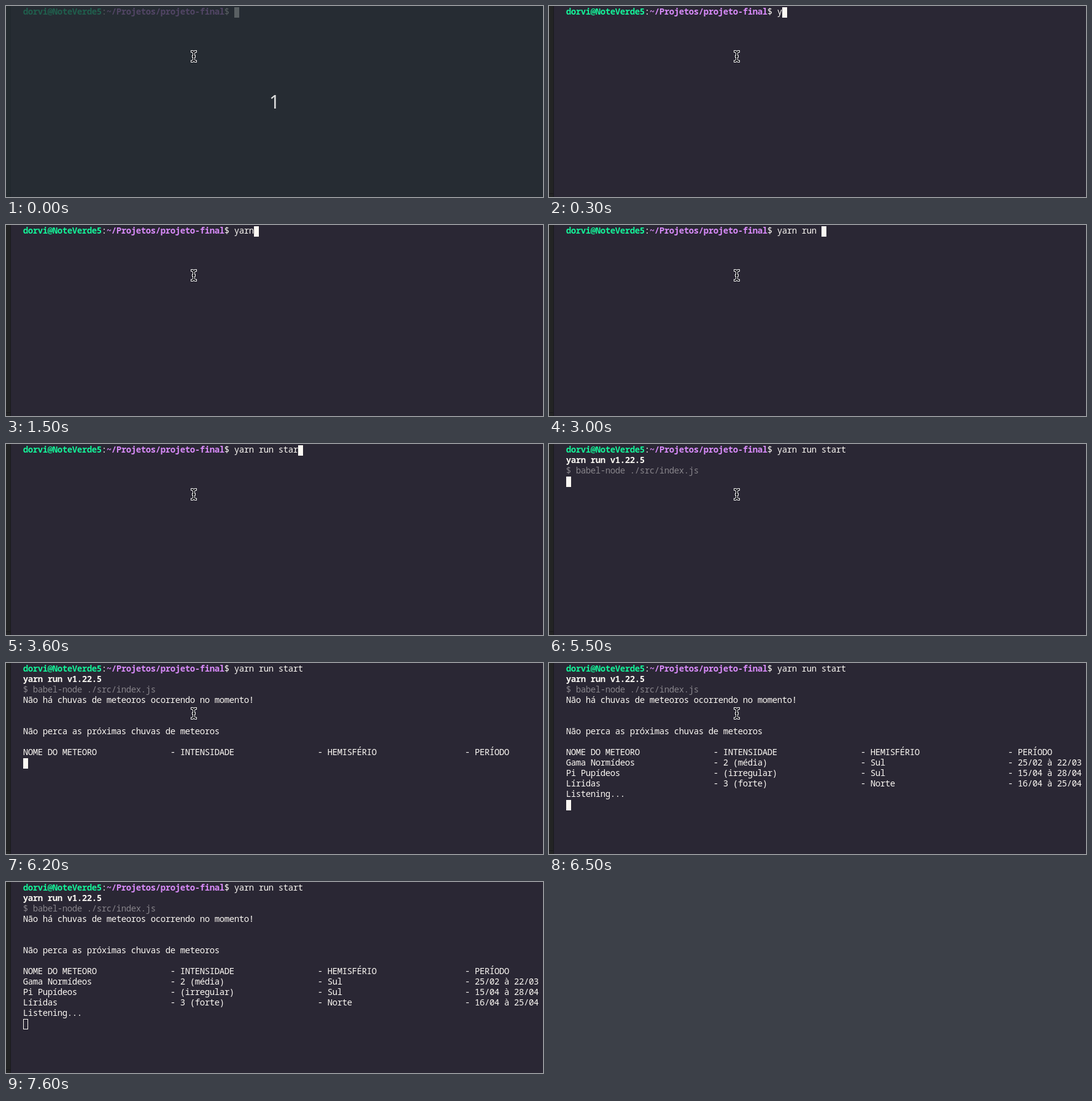
An HTML page with a canvas for the animation above (7700 ms loop, 875 by 311 pixels).

```html
<!DOCTYPE html>
<html lang="pt">
<head>
<meta charset="utf-8">
<title>Terminal</title>
<style>
  html, body { margin: 0; width: 100%; height: 100%; overflow: hidden; background: #2a2734; }
  canvas { display: block; }
</style>
</head>
<body>
<canvas id="stage" width="875" height="311"></canvas>
<script>
const ctx = document.getElementById('stage').getContext('2d');
const LOOP = 7700, LEFT = 28, TOP = 2, CELL = 8, LINE = 17;
const WHITE = '#fbf8f3', GREY = '#87848a', GREEN = '#14f59a', PURPLE = '#da8cfb', BACK = '#2a2734';

const command = 'yarn run start';
const promptLength = 43;
// [time, number of typed characters]
const typing = [[0, 0], [300, 1], [1000, 2], [1200, 3], [1500, 4], [2000, 5], [2300, 7],
  [2700, 8], [3000, 9], [3200, 10], [3400, 11], [3600, 13], [3700, 14]];

const columns = (...cells) =>
  cells.map((cell, i) => ((i ? '- ' : '') + cell).padEnd(30)).join('').trimEnd();

// Blocks of output: each one ends with the cursor on the following line
const output = [
  { time: 4500, lines: [] },
  { time: 5000, lines: ['yarn run v1.22.5'], weight: 'bold' },
  { time: 5500, lines: ['$ babel-node ./src/index.js'], color: GREY },
  { time: 6200, lines: [
    'Não há chuvas de meteoros ocorrendo no momento!', '', '',
    'Não perca as próximas chuvas de meteoros', '',
    columns('NOME DO METEORO', 'INTENSIDADE', 'HEMISFÉRIO', 'PERÍODO')] },
  { time: 6500, lines: [
    columns('Gama Normídeos', '2 (média)', 'Sul', '25/02 à 22/03'),
    columns('Pi Pupídeos', '(irregular)', 'Sul', '15/04 à 28/04'),
    columns('Líridas', '3 (forte)', 'Norte', '16/04 à 25/04'),
    'Listening...'] }
];

const pointer = [
  { time: 0, x: 306, y: 82, draw: drawBeam },
  { time: 6900, x: 236, y: 62, draw: drawBeam },
  { time: 7000, x: 137, y: 36, draw: drawBeam },
  { time: 7100, x: 156, y: 31, draw: drawArrow },
  { time: 7400, draw() {} }
];

// Every character is centred in its own cell of the terminal grid
function write(text, column, row, color = WHITE, weight = 500) {
  ctx.font = `${weight} 14px "Noto Sans Mono", monospace`;
  ctx.fillStyle = color;
  ctx.textAlign = 'center';
  [...text].forEach((char, i) =>
    ctx.fillText(char, LEFT + (column + i + 0.5) * CELL, TOP + 12 + row * LINE));
}

function outline(path, x, y, outer, inner) {
  ctx.save();
  ctx.translate(x, y);
  ctx.lineCap = 'square';
  for (const [width, color] of [[outer, '#eeeeee'], [inner, '#1b1b20']]) {
    ctx.lineWidth = width;
    ctx.strokeStyle = color;
    ctx.stroke(path);
  }
  ctx.restore();
}

function drawBeam(x, y) {
  outline(new Path2D('M-3-8H-2L0-6L2-8H3M-3 8H-2L0 6L2 8H3M0-6V6M-1 0H1'), x, y, 4, 2);
}

function drawArrow(x, y) {
  const path = new Path2D('M1 1V15L4 12L7 18L9 17L6.5 11H11Z');
  outline(path, x, y, 3, 1);
  ctx.save();
  ctx.translate(x, y);
  ctx.fillStyle = '#1b1b20';
  ctx.fill(path);
  ctx.restore();
}

function drawCursor(column, row, focused) {
  const x = LEFT + column * CELL, y = TOP + row * LINE;
  ctx.fillStyle = ctx.strokeStyle = WHITE;
  ctx.lineWidth = 1;
  if (focused) ctx.fillRect(x, y, CELL, LINE);
  else ctx.strokeRect(x + 0.5, y + 0.5, CELL - 1, LINE - 1);
}

function drawWindow() {
  ctx.fillStyle = BACK;
  ctx.fillRect(0, 0, 875, 311);
  ctx.fillStyle = '#232424';
  ctx.fillRect(0, 0, 7, 311);
  ctx.fillStyle = '#19191e';
  ctx.fillRect(7, 0, 1, 311);
  ctx.fillRect(0, 305, 7, 1);
}

function drawCountdown() {
  ctx.fillStyle = 'rgba(37, 46, 51, 0.75)';
  ctx.fillRect(0, 0, 875, 311);
  ctx.fillStyle = '#dcdddd';
  ctx.font = '30px "Noto Sans", sans-serif';
  ctx.textAlign = 'center';
  ctx.fillText('1', 437.5, 166.5);
}

function drawTerminal(time) {
  write('dorvi@NoteVerde5', 0, 0, GREEN, 'bold');
  write(':', 16, 0);
  write('~/Projetos/projeto-final', 17, 0, PURPLE, 'bold');
  write('$', 41, 0);

  const typed = typing.findLast(step => step[0] <= time)[1];
  write(command.slice(0, typed), promptLength, 0);

  let column = promptLength + typed, row = 0;
  for (const block of output) {
    if (time < block.time) break;
    column = 0;
    if (!row) row = 1;
    for (const line of block.lines) write(line, 0, row++, block.color, block.weight);
  }
  drawCursor(column, row, time < 7600);
}

function frame() {
  const time = performance.now() % LOOP;
  drawWindow();
  drawTerminal(time);
  if (time < 300) drawCountdown();
  const mouse = pointer.findLast(step => step.time <= time);
  mouse.draw(mouse.x, mouse.y);
  requestAnimationFrame(frame);
}
frame();
</script>
</body>
</html>
```
